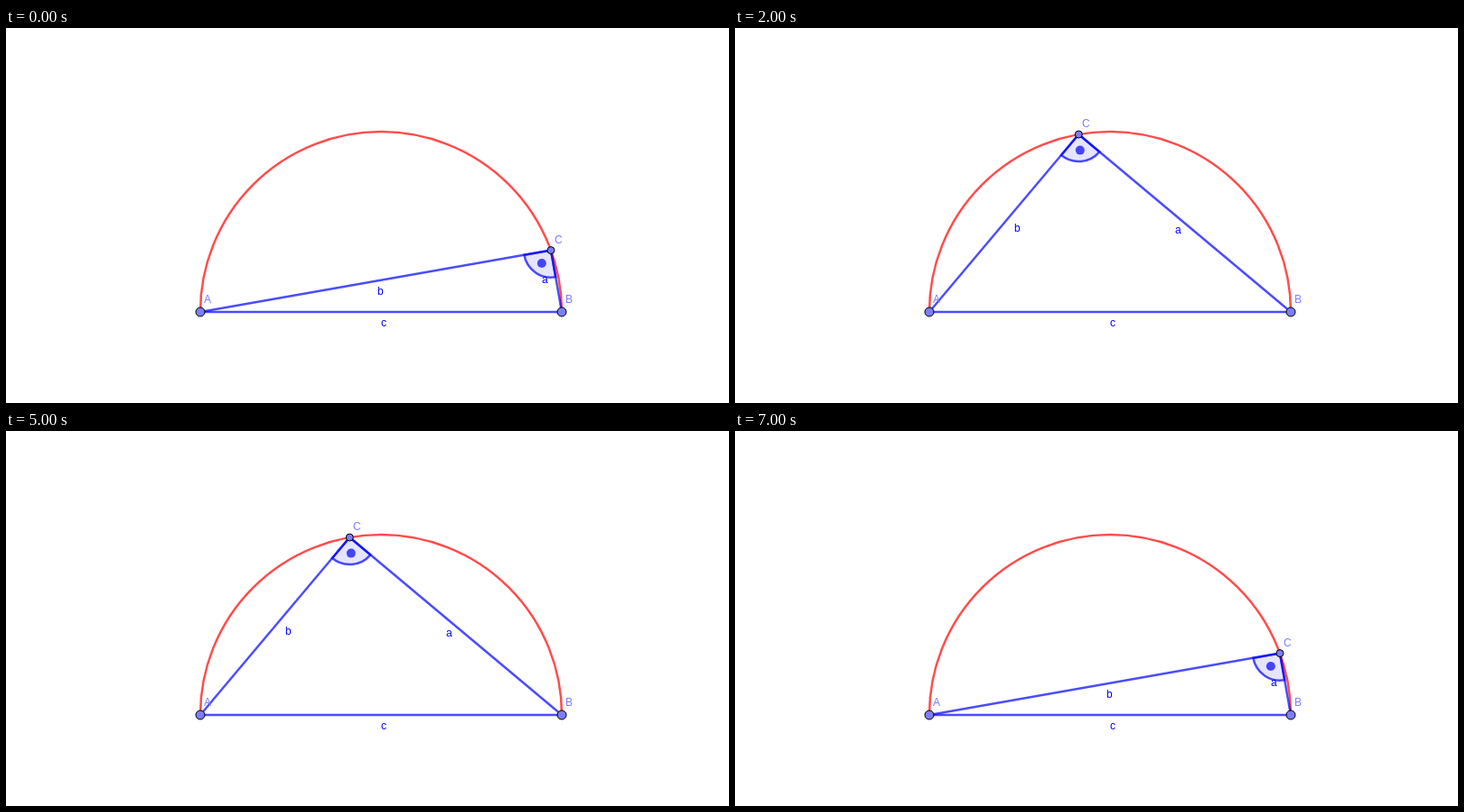
An HTML page with a canvas for the animation above (7.5 s loop, 800 by 416 pixels).

```html
<!DOCTYPE html>
<html lang="en">
<head>
<meta charset="utf-8">
<title>Right angle in a semicircle</title>
<style>
  html, body { margin: 0; width: 800px; height: 416px; overflow: hidden; background: #fff; }
  canvas { display: block; }
</style>
</head>
<body>
<canvas id="stage" width="800" height="416"></canvas>
<script>
const ctx = document.getElementById('stage').getContext('2d');
const STEP = 500, STEPS = 15;
const RADIUS = 200, MID = { x: 415, y: 315 };
const A = { x: MID.x - RADIUS, y: MID.y }, B = { x: MID.x + RADIUS, y: MID.y };
const LINE = 'rgba(0,0,255,0.7)', POINT = '#7d7dff';

function text(str, x, y, color) {
  ctx.fillStyle = color;
  ctx.fillText(str, x, y);
}

function stroke(color, width) {
  ctx.strokeStyle = color;
  ctx.lineWidth = width;
  ctx.stroke();
}

function disc(x, y, r, color) {
  ctx.beginPath();
  ctx.arc(x, y, r, 0, 2 * Math.PI);
  ctx.fillStyle = color;
  ctx.fill();
}

// The label sits 16 px to the right of the direction p -> q.
function segment(p, q, name) {
  ctx.beginPath();
  ctx.moveTo(p.x, p.y);
  ctx.lineTo(q.x, q.y);
  stroke(LINE, 2.5);
  const dx = q.x - p.x, dy = q.y - p.y, k = 16 / Math.hypot(dx, dy);
  const x = (p.x + q.x) / 2 - dy * k, y = (p.y + q.y) / 2 + dx * k;
  text(name, Math.floor(x + 1e-6), Math.floor(y + 1e-6), '#00f');
}

function point(p, r, name) {
  disc(p.x, p.y, r, POINT);
  stroke('#000', 1);
  text(name, Math.round(p.x) + 4, Math.round(p.y) - 2 * r, POINT);
}

function rightAngle(c) {
  const toB = Math.atan2(B.y - c.y, B.x - c.x);
  const half = toB + Math.PI / 4;
  ctx.beginPath();
  ctx.moveTo(c.x, c.y);
  ctx.arc(c.x, c.y, 30, toB, toB + Math.PI / 2);
  ctx.closePath();
  ctx.fillStyle = 'rgba(0,0,255,0.1)';
  ctx.fill();
  stroke(LINE, 2.5);
  const d = 30 / 1.7;
  disc(c.x + d * Math.cos(half), c.y + d * Math.sin(half), 5, LINE);
}

function draw(time) {
  const i = Math.floor(time / STEP) % STEPS;
  const turn = (160 - 20 * Math.abs(7 - i)) * Math.PI / 180;
  const C = { x: MID.x + RADIUS * Math.cos(turn), y: MID.y - RADIUS * Math.sin(turn) };

  ctx.fillStyle = '#fff';
  ctx.fillRect(0, 0, 800, 416);
  ctx.font = '12px "Liberation Sans", Arial, sans-serif';

  rightAngle(C);
  ctx.beginPath();
  ctx.arc(MID.x, MID.y, RADIUS, Math.PI, 2 * Math.PI);
  stroke('rgba(255,0,0,0.7)', 2.5);
  segment(A, B, 'c');
  segment(C, B, 'a');
  segment(A, C, 'b');
  point(A, 5, 'A');
  point(B, 5, 'B');
  point(C, 4, 'C');
}

function tick() {
  draw(performance.now());
  requestAnimationFrame(tick);
}
tick();
</script>
</body>
</html>
```
